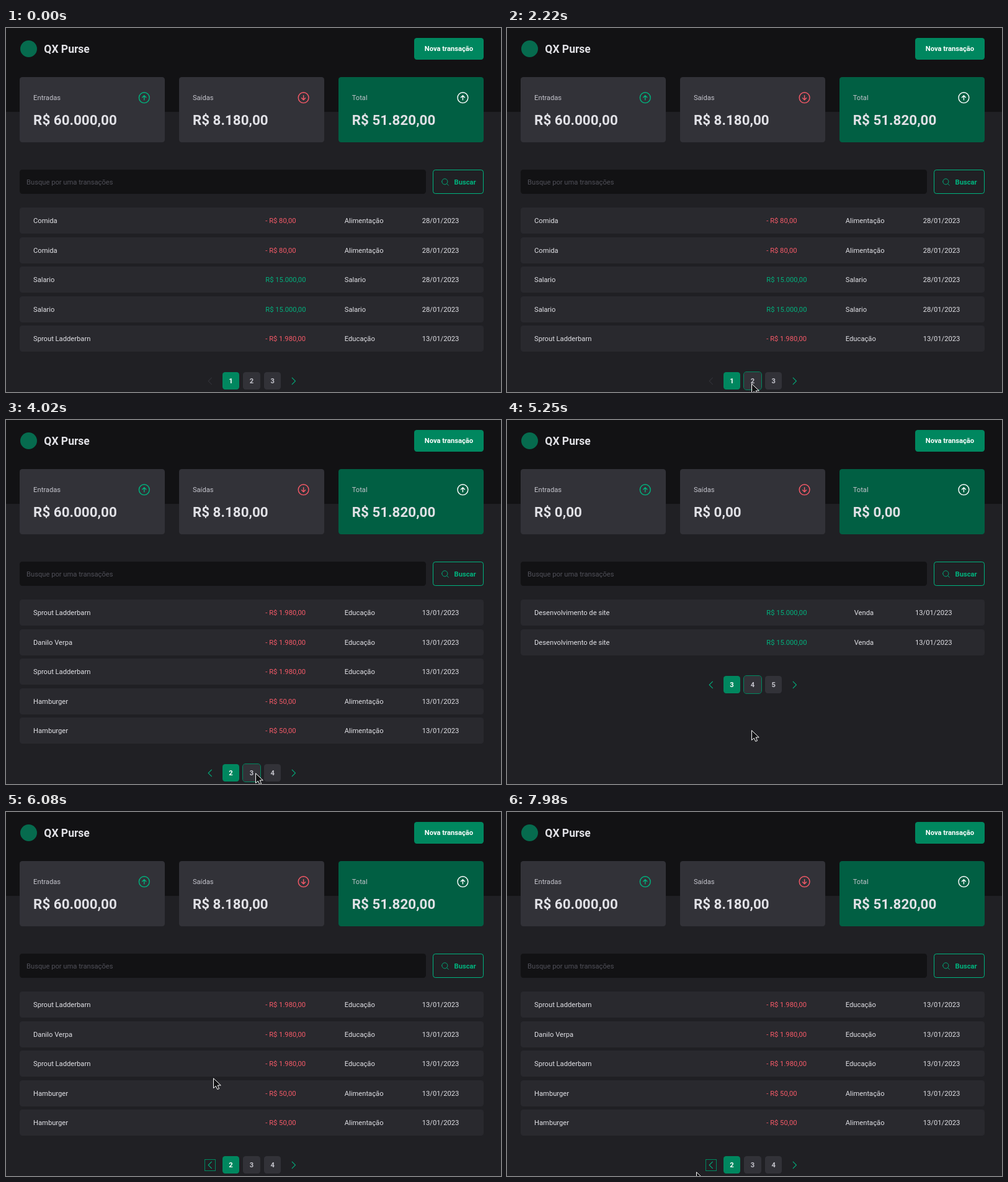
Animation, 798 px wide and 586 px high, one loop 8000 ms. Source, as an HTML page:

```html
<!DOCTYPE html>
<html lang="pt-BR">
<head>
<meta charset="utf-8">
<title>Transações</title>
<style>
  html, body { margin: 0; width: 100%; height: 100%; overflow: hidden; background: #202024; }
  svg { display: block; width: 798px; height: 586px; }
  text { font: 400 11.2px Roboto, sans-serif; fill: #e1e1e6; white-space: pre; }
  .bold { font-weight: 700; }
  .mid { text-anchor: middle; }
  .brand { font-size: 17.5px; font-weight: 700; }
  .sum { font-size: 22.4px; font-weight: 700; }
  .label { fill: #c4c4cc; }
  .hint { fill: #505059; }
  .in { fill: #00b37e; }
  .out { fill: #f75a68; }
  .white { fill: #fff; }
  .line { fill: none; stroke-linecap: round; stroke-linejoin: round; }
  .ring { fill: none; stroke: #00875f; }
</style>
</head>
<body>
<svg viewBox="0 0 798 586">
  <rect width="798" height="586" fill="#202024"/>
  <rect width="798" height="135" fill="#121214"/>
  <circle cx="36.5" cy="33.5" r="13.5" fill="#066b4e"/>
  <text class="brand" x="61.3" y="39.5">QX Purse</text>
  <rect x="658" y="16" width="112" height="35" rx="4.2" fill="#00875f"/>
  <text class="bold mid white" x="714" y="37">Nova transação</text>
  <g id="cards"></g>
  <rect x="22" y="228" width="655" height="39" rx="4.2" fill="#121214"/>
  <text class="hint" x="33" y="252">Busque por uma transações</text>
  <rect x="688.5" y="228.5" width="81" height="38" rx="3.7" fill="none" stroke="#00b37e"/>
  <path class="line" stroke="#00b37e" stroke-width=".9" d="M702.7 247.3a4.6 4.6 0 1 0 9.2 0a4.6 4.6 0 1 0-9.2 0M710.6 250.6l2.7 2.7"/>
  <text class="bold in" x="722.5" y="252">Buscar</text>
  <g id="rows"></g>
  <g id="pager"></g>
  <g id="pointer" visibility="hidden">
    <path id="arrow" fill="#121214" stroke="#fff" d="M.5 .8V16.5L4.3 13.2L6.8 18.5L9.6 17.4L7.2 12H12.3Z"/>
    <g id="beam" class="line">
      <path stroke="#fff" stroke-width="2.6" d="M-2 -7H2M0 -7V7M-2 7H2"/>
      <path stroke="#121214" d="M-2 -7H2M0 -7V7M-2 7H2"/>
    </g>
  </g>
</svg>
<script>
const LOOP = 8000;
const $ = id => document.getElementById(id);

const course = ['Sprout Ladderbarn', '- R$ 1.980,00', 'Educação', '13/01/2023'];
const meal = ['Comida', '- R$ 80,00', 'Alimentação', '28/01/2023'];
const salary = ['Salario', 'R$ 15.000,00', 'Salario', '28/01/2023'];
const burger = ['Hamburger', '- R$ 50,00', 'Alimentação', '13/01/2023'];
const site = ['Desenvolvimento de site', 'R$ 15.000,00', 'Venda', '13/01/2023'];

const wide = [44, 418.3, 545.8, 670.8];
const narrow = [44, 418.3, 559.7, 658];
const pages = {
  1: { columns: wide, rows: [meal, meal, salary, salary, course] },
  2: { columns: wide, rows: [course, ['Danilo Verpa', ...course.slice(1)], course, burger, burger] },
  3: { columns: narrow, rows: [site, site] }
};

const cards = [
  { label: 'Entradas', sum: '60.000,00', fill: '#323238', ink: '#00b37e', turn: 0 },
  { label: 'Saídas', sum: '8.180,00', fill: '#323238', ink: '#f75a68', turn: 180 },
  { label: 'Total', sum: '51.820,00', fill: '#015f43', ink: '#fff', turn: 0 }
];

// For each page visit: when its rows, its page numbers and the reloaded totals appear.
const visits = [
  { page: 1, rows: 0, pager: 0, totals: 0 },
  { page: 2, rows: 2330, pager: 2820, totals: 3350 },
  { page: 3, rows: 4690, pager: 5130, totals: 5720 },
  { page: 2, rows: 6080, pager: 6080, totals: 6080 }
];
const NEXT_CLICK = 2220, PREV_CLICK = 5970;

// Each glide starts where the one before ended and bends towards `via`.
const glides = [
  { start: 1220, steps: 5, from: [420, 586], to: [422, 442] },
  { start: 1420, steps: 7, to: [402, 574] },
  { start: 1800, steps: 4, every: 56, to: [394, 572] },
  { start: 3900, steps: 4, to: [402, 568] },
  { start: 5130, steps: 10, every: 50, via: [414, 486], to: [334, 430] },
  { start: 5800, steps: 1, to: [334, 428] },
  { start: 6660, steps: 12, via: [221, 368], to: [112.5, 405.5] },
  { start: 7360, steps: 1, to: [111.5, 406.5] },
  { start: 7680, steps: 8, every: 42.8, via: [58, 540], to: [305, 579] }
];

const latest = (list, key, t) => list.filter(item => item[key] <= t).pop();
const text = (x, y, cls, str) => `<text class="${cls}" x="${x}" y="${y}">${str}</text>`;
const box = (x, y, w, h, r, attrs) =>
  `<rect x="${x}" y="${y}" width="${w}" height="${h}" rx="${r}" ${attrs}/>`;

function drawCards(isLoading) {
  return cards.map(({ label, sum, fill, ink, turn }, i) => {
    const x = 22 + 256.8 * i;
    return box(Math.round(x), 79, 234, 105, 4.2, `fill="${fill}"`) +
      text(x + 22.1, 116, 'label', label) +
      text(x + 22.1, 156, 'sum', 'R$ ' + (isLoading ? '0,00' : sum)) +
      `<g class="line" stroke="${ink}" stroke-width="1.4"
        transform="translate(${x + 200.8} 112.2) rotate(${turn})">
        <circle r="8.4"/><path d="M0 3.5V-3.5M-3 -.5L0 -3.5L3 -.5"/></g>`;
  }).join('');
}

function drawRows({ columns, rows }) {
  return rows.map((row, i) => {
    const y = Math.round(289 + 47.6 * i);
    const cells = row.map((cell, c) =>
      text(columns[c], y + 25, c !== 1 ? '' : cell[0] === '-' ? 'out' : 'in', cell));
    return box(22, y, 748, 42, 4.2, 'fill="#29292e"') + cells.join('');
  }).join('');
}

function drawPager(first, y, focused) {
  const buttons = [0, 1, 2].map(i => {
    const center = 362.4 + 33.6 * i;
    const left = Math.round(center - 13.7);
    const width = Math.round(center + 13.7) - left;
    return box(left, y - 14, width, 28, 4.2, `fill="${i ? '#323238' : '#00875f'}"`) +
      text(center, y + 4, 'bold mid ' + (i ? 'label' : 'white'), first + i);
  });
  const caret = (x, dx, ink) =>
    `<path class="line" stroke="${ink}" stroke-width="1.1" d="M${x} ${y - 4.9}l${dx} 5.25l${-dx} 5.25"/>`;
  const rings = {
    next: box(381.5, y - 14.5, 29, 29, 4.5, 'class="ring"'),
    prev: box(320.5, y - 8.5, 17, 18, 0, 'class="ring"')
  };
  return buttons.join('') + (rings[focused] || '') +
    caret(331.4, -5.25, first > 1 ? '#00b37e' : '#323238') + caret(461.2, 5.25, '#00b37e');
}

function pointerAt(t) {
  const glide = latest(glides, 'start', t);
  if (!glide) return null;
  const { start, steps, every = 40, to } = glide;
  const from = glide.from || glides[glides.indexOf(glide) - 1].to;
  const via = glide.via || from.map((a, i) => (a + to[i]) / 2);
  const step = Math.min(steps, Math.floor((t - start) / every) + 1);
  const u = Math.sin(step / steps * Math.PI / 2);
  return from.map((a, i) => (1 - u) ** 2 * a + 2 * u * (1 - u) * via[i] + u * u * to[i]);
}

function placePointer(point) {
  $('pointer').setAttribute('visibility', point ? 'visible' : 'hidden');
  if (!point) return;
  const [x, y] = point;
  const overText = x < 130 && Math.abs(y - 405) < 10;
  $('pointer').setAttribute('transform', `translate(${x} ${y})`);
  $('arrow').style.display = overText ? 'none' : '';
  $('beam').style.display = overText ? '' : 'none';
}

const drawn = {};
function update(id, key, draw) {
  if (drawn[id] === key) return;
  drawn[id] = key;
  $(id).innerHTML = draw();
}

function render(t) {
  const { page } = latest(visits, 'rows', t);
  const numbered = latest(visits, 'pager', t);
  const isLoading = t < numbered.totals;
  const focused = t < NEXT_CLICK ? '' : t < PREV_CLICK ? 'next' : 'prev';
  const first = numbered.page;
  const pagerY = page === 3 ? 426 : 568;
  update('cards', isLoading, () => drawCards(isLoading));
  update('rows', page, () => drawRows(pages[page]));
  update('pager', [first, pagerY, focused].join(), () => drawPager(first, pagerY, focused));
  placePointer(pointerAt(t));
}

const began = performance.now();
function tick() {
  render((performance.now() - began) % LOOP);
  requestAnimationFrame(tick);
}
tick();
</script>
</body>
</html>
```
